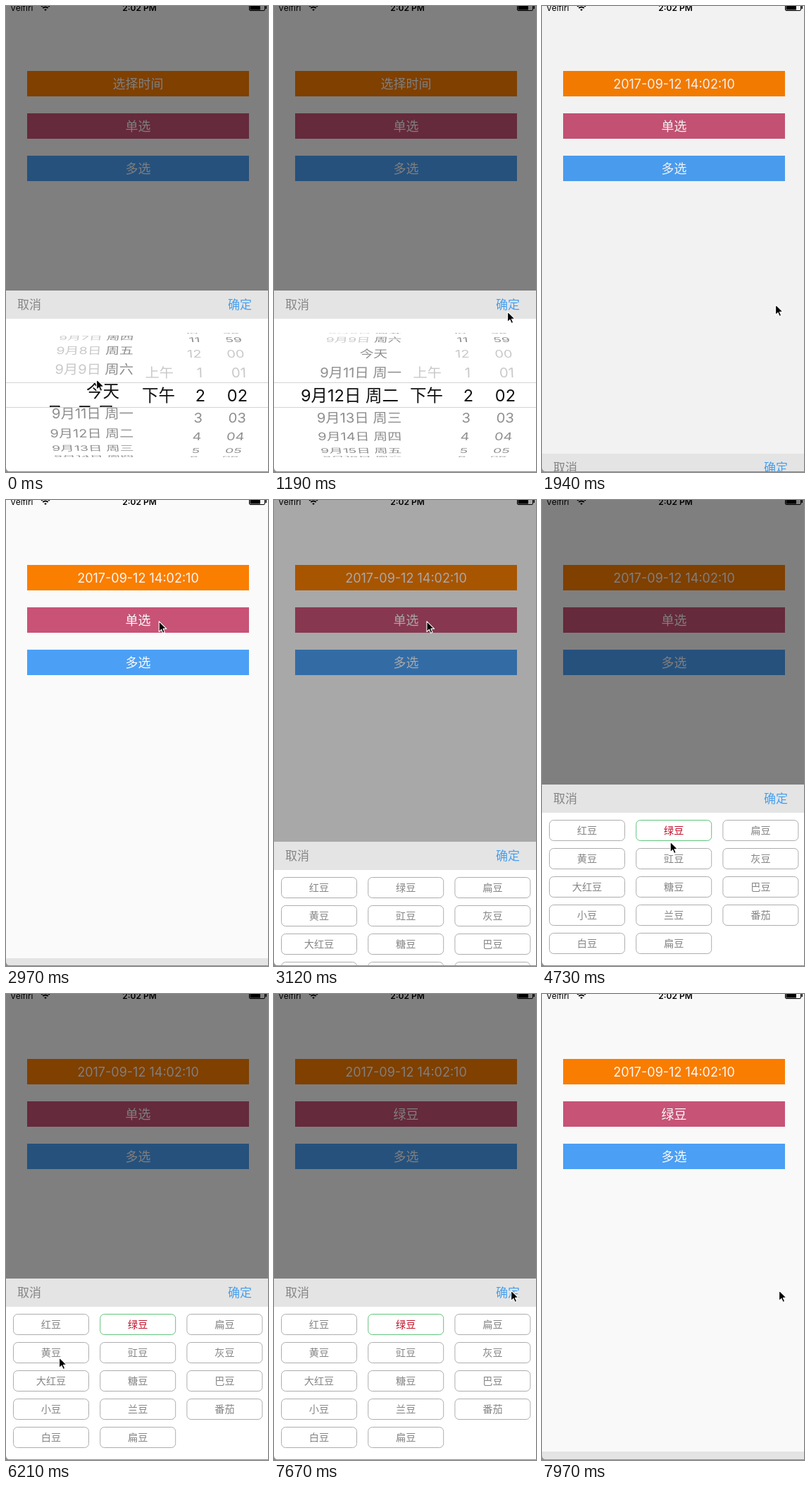
Animation of 372x660 px, one loop 8000 ms. Source, as an HTML page:

```html
<!DOCTYPE html>
<html lang="zh">
<head>
<meta charset="utf-8">
<title>Picker demo</title>
<style>
  html, body { margin: 0; width: 100%; height: 100%; overflow: hidden; background: #fff; }
  svg { display: block; width: 372px; height: 660px; }
  text { font-family: Inter, "Noto Sans CJK SC", "Noto Sans CJK", sans-serif; }
  .mid { text-anchor: middle; }
  .end { text-anchor: end; }
</style>
</head>
<body>
<svg viewBox="0 0 372 660">
  <defs>
    <clipPath id="drum"><path d="M0 463H372V533H0ZM0 568H372V639H0Z"/></clipPath>
    <clipPath id="band"><path d="M0 534H372V568H0Z"/></clipPath>
  </defs>
  <rect width="372" height="660" fill="#fff"/>

  <g id="status">
    <text x="6" y="6.5" font-size="12">Velfiri</text>
    <g fill="none" stroke="#000" stroke-width="1.9">
      <path d="M50.2 .8a8.2 8.2 0 0 1 11.6 0M52.3 3a5.2 5.2 0 0 1 7.4 0"/>
      <path d="M54.6 5.3a2 2 0 0 1 2.8 0L56 6.6Z" fill="#000" stroke-width=".6"/>
    </g>
    <text class="mid" x="189.5" y="6.5" font-size="12" font-weight="600">2:02 PM</text>
    <rect x="345.5" y="-3.5" width="22" height="10" rx="1.5" fill="none" stroke="#000"/>
    <path d="M346.5 -2.5H361V5.5H346.5ZM368.5 0H370V4H368.5Z"/>
  </g>

  <g id="buttons"></g>
  <rect id="shade" width="372" height="660"/>

  <g id="sheet">
    <rect y="403" width="372" height="257" fill="#fff"/>
    <rect y="403" width="372" height="40" fill="#e4e4e4"/>
    <text x="16" y="429.3" font-size="17" fill="#858585">取消</text>
    <text x="315" y="429.3" font-size="17" fill="#449fee">确定</text>
    <g id="wheel">
      <g id="outer" clip-path="url(#drum)" fill="#8e8e8e"></g>
      <g id="inner" clip-path="url(#band)" fill="#111"></g>
      <path d="M0 533.5H372M0 568.5H372" stroke="#d4d4d4"/>
    </g>
    <g id="tags"></g>
  </g>

  <path d="M0 654Q.5 659 5 659H372V660H0Z" fill="#8f8f8f"/>
  <path id="cursor" d="M.6 .8V15.6L4 12.4 6.2 17.4 8.7 16.3 6.5 11.4H11.2Z"
        stroke="#fff" stroke-width="1.1" stroke-linejoin="round"/>
</svg>

<script>
const $ = id => document.getElementById(id);
const LOOP = 8000, STEP = 147.7;
const MID_X = 186, MID_Y = 551;       // centre of the drum
const RADIUS = 88, TURN = 21 * Math.PI / 180, ROW = 31.5;

const centred = (x, y, size, fill, label) =>
  `<text class="mid" x="${x}" y="${y + size * .37}" font-size="${size}" fill="${fill}">${label}</text>`;

// Linear track through [step, value, ...] points
function track(points, k) {
  const next = points.findIndex(p => p[0] > k);
  if (next < 0) return points[points.length - 1].slice(1);
  if (next === 0) return points[0].slice(1);
  const a = points[next - 1], b = points[next];
  const f = (k - a[0]) / (b[0] - a[0]);
  return a.slice(1).map((v, i) => v + (b[i + 1] - v) * f);
}

function ease(k, start) {
  const x = Math.min(1, Math.max(0, (k - start) / 2));
  return x * x * (3 - 2 * x);
}

const mod = (n, m) => (n % m + m) % m;
const pad = n => String(n).padStart(2, '0');
const pale = label => `<tspan fill="#c9c9c9">${label}</tspan>`;
const paleIf = (i, label) => i === -1 || i === -2 ? pale(label) : label;

function dateLabel(i) {
  if (i === 0) return '今天';
  const day = `9月${10 + i}日`;
  return `${i < 0 ? pale(day) : day} 周${'日一二三四五六'[mod(i, 7)]}`;
}

// right: edge on the drum, front: edge in the selected band, mid: middle of the column
const columns = [
  { right: 181, front: 177, mid: 118, label: dateLabel },
  { right: 238, front: 240, mid: 217, label: i => i === 0 ? '下午' : i === -1 ? pale('上午') : '' },
  { right: 279, front: 283, mid: 268, label: i => paleIf(i, mod(i + 1, 12) + 1) },
  { right: 341, front: 343, mid: 328, label: i => paleIf(i, pad(mod(i + 2, 60))) }
];

function drumRow(col, i, offset) {
  const angle = offset * TURN, cos = Math.cos(angle), sin = Math.sin(angle);
  if (cos <= 0) return '';
  const today = col === columns[0] && i === 0;
  const scale = 1.005 - .081 * (1 - cos);
  const x = MID_X + (col.right - (today ? 20 : 0) - MID_X) * scale;
  const skew = (col.mid - MID_X) * -.081 * sin / RADIUS;
  const matrix = [scale, 0, skew, cos, x, MID_Y + RADIUS * sin].map(v => v.toFixed(4));
  return `<text class="end" y="7.5" font-size="20.3" transform="matrix(${matrix})">${col.label(i)}</text>`;
}

function bandRow(col, i, offset) {
  const today = col === columns[0] && i === 0;
  const x = col.front - (today ? 16 : 0), y = MID_Y + ROW * offset + 8.7;
  return `<text class="end" x="${x}" y="${y}" font-size="23.5">${col.label(i)}</text>`;
}

function drawWheel(position) {
  let outer = '', inner = '';
  columns.forEach((col, c) => {
    const at = c === 0 ? position : 0, near = Math.round(at);
    for (let i = near - 4; i <= near + 4; i++) {
      outer += drumRow(col, i, i - at);
      if (Math.abs(i - at) < 1.3 && (c === 0 || i === 0)) inner += bandRow(col, i, i - at);
    }
  });
  $('outer').innerHTML = outer;
  $('inner').innerHTML = inner;
}

function drawButtons(labels) {
  const colours = ['#ff8000', '#cc5579', '#4da3fa'];
  $('buttons').innerHTML = labels.map((label, i) =>
    `<rect x="30" y="${92 + i * 60}" width="315" height="36" fill="${colours[i]}"/>` +
    centred(187.5, 110 + i * 60, 18, '#fff', label)).join('');
}

const beans = '红豆 绿豆 扁豆 黄豆 豇豆 灰豆 大红豆 糖豆 巴豆 小豆 兰豆 番茄 白豆 扁豆'.split(' ');

function drawTags(selected) {
  $('tags').innerHTML = beans.map((name, i) => {
    const x = 10.5 + i % 3 * 123.2, y = 453.5 + Math.floor(i / 3) * 40, on = i === selected;
    return `<rect x="${x}" y="${y}" width="107" height="29" rx="6" fill="#fff" stroke="${on ? '#62c47c' : '#adadad'}"/>` +
      centred(x + 53.5, y + 14.5, 14.2, on ? '#bf1029' : '#858585', name);
  }).join('');
}

const spin = [[0, .19], [1, .6], [2, .9], [3, 1], [4, 1], [5, 1.4], [6, 1.85], [7, 2]];
const pointer = [
  [0, 128, 528], [5, 128, 528], [6, 170, 506], [7, 348, 440], [8, 331, 432], [11, 331, 422],
  [13, 331, 422], [16, 290, 300], [19, 217, 171], [22, 216, 171], [25, 200, 380], [27, 190, 461],
  [30, 192, 466], [35, 166, 509], [38, 115, 530], [41, 66, 520], [42, 75, 514], [43, 75, 514],
  [44, 73, 513], [49, 346, 432], [51, 336, 419]
];

function render(k) {
  const up = k < 16 ? 1 - ease(k, 11.39) : k < 40 ? ease(k, 19.75) : 1 - ease(k, 52.26);
  const picking = k < 18;
  drawButtons([k < 12 ? '选择时间' : '2017-09-12 14:02:10', k < 52 ? '单选' : '绿豆', '多选']);
  $('shade').setAttribute('opacity', up / 2);
  $('sheet').setAttribute('transform', `translate(0 ${Math.round(257 * (1 - up))})`);
  $('wheel').style.display = picking ? '' : 'none';
  $('tags').style.display = picking ? 'none' : '';
  if (picking) drawWheel(track(spin, k)[0]);
  else drawTags(k < 30 ? -1 : 1);
  $('cursor').setAttribute('transform', `translate(${track(pointer, k)})`);
}

let shown = -1;
const begin = performance.now();
function tick() {
  const time = (performance.now() - begin) % LOOP;
  const k = Math.floor((time + 12) / STEP);
  if (k !== shown) render(shown = k);
  requestAnimationFrame(tick);
}
tick();
</script>
</body>
</html>
```
